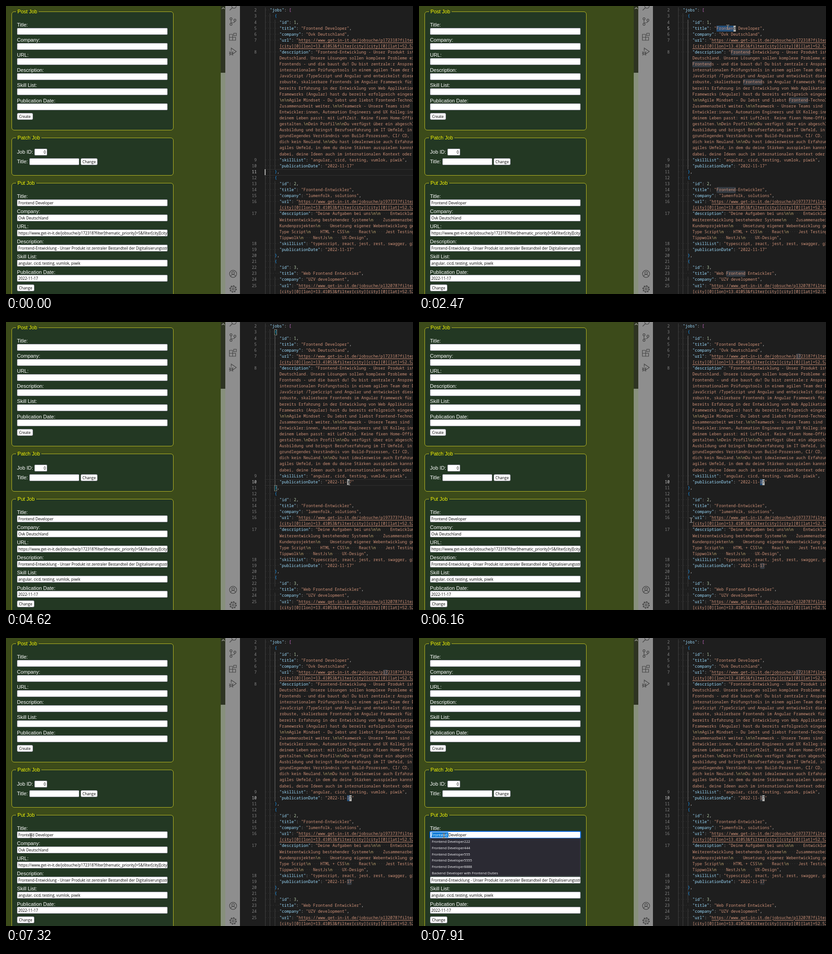
Animation of 889x630 px, one loop 8000 ms. Source, as an HTML page:

```html
<!DOCTYPE html>
<html lang="de">
<head>
<meta charset="utf-8">
<title>Job forms and JSON</title>
<style>
html, body { margin: 0; width: 100%; height: 100%; overflow: hidden; background: #3c4b1a; }
#stage { position: relative; width: 889px; height: 630px; overflow: hidden; background: #3c4b1a; }
#stage div { position: absolute; box-sizing: border-box; white-space: pre; }
.set { left: 12px; width: 354px; background: #233823; border: 1px solid #b8b824; border-radius: 6px; }
.legend, .label { font: 11.1px/14px "Liberation Sans", Arial, sans-serif; height: 14px; color: #fff; }
#stage .legend { left: 22px; padding: 0 3px; color: #ff0; }
.legend::before { content: ""; position: absolute; z-index: -1; left: 0; right: 0; top: 6px; height: 3px; background: #233823; }
.field, .button, .menu { font: 8.25px/13px "Open Sans", "Noto Sans", sans-serif; color: #000; }
.field { height: 15px; background: #fff; border: 1px solid #8f8f9d; border-radius: 2px; padding: 0 2px; overflow: hidden; }
.button { height: 15px; background: #fff; border: 1px solid #8f8f9d; border-radius: 3px; text-align: center; }
.focus { outline: 2px solid #0a66d8; outline-offset: -1px; border-color: #0a66d8; }
.picked { background: #0078d7; color: #fff; }
.menu { left: 24px; top: 438px; width: 329px; height: 83px; background: #2b2a33; border: 1px solid #42414d; color: #fbfbfe; }
.menu div { left: 3px; font-size: 7.6px; line-height: 14px; }
.editor { left: 511px; top: 0; width: 378px; height: 630px; background: #1e1e1e; }
.row, .num, .caret { font: 8.78px/13.09px "Noto Sans Mono", "DejaVu Sans Mono", monospace; height: 13.09px; color: #d4d4d4; }
.num { left: 511px; width: 36.5px; text-align: right; color: #858585; }
.num.on { color: #d6d6d6; }
.key { color: #9cdcfe; } .str { color: #ce9178; } .esc { color: #d7ba7d; } .int { color: #b5cea8; }
.link { text-decoration: underline; text-underline-offset: 1.5px; text-decoration-thickness: 1px; }
.dot { color: #464646; }
.guide { width: 1px; background: #404040; }
.guide.on { background: #707070; }
.line { left: 565px; width: 324px; height: 14px; border: solid #303030; border-width: 1px 0; }
.mark { background: #343a41; border-radius: 2px; height: 13px; }
.sel { background: #264f78; height: 13px; }
.blur .sel { background: #3a3d41; }
.blur .mark { background: #2b2e32; }
.pair { left: 586px; width: 6px; height: 13px; border: 1px solid #888; background: #10281a; }
.caret { width: 5.3px; background: #b4b4b2; color: #1e1e1e; overflow: hidden; }
#mouse { left: 0; top: 0; width: 7px; height: 11px; mix-blend-mode: difference; }
#stage svg { position: absolute; left: 0; top: 0; overflow: visible; }
</style>
</head>
<body>
<div id="stage"></div>
<script>
const stage = document.getElementById('stage');
const LOOP = 8000, CHAR = 5.268, PITCH = 13.09, COL0 = 565.6, TOP0 = 3.4;

function add(cls, box = {}, html = '', parent = stage) {
  const el = document.createElement('div');
  el.className = cls;
  for (const k in box) el.style[k] = box[k] + 'px';
  el.innerHTML = html;
  return parent.appendChild(el);
}
const rowTop = r => TOP0 + r * PITCH;
const esc = s => s.replace(/&/g, '&amp;').replace(/</g, '&lt;');

// ---- Forms ----
const labels = ['Title:', 'Company:', 'URL:', 'Description:', 'Skill List:', 'Publication Date:'];
const values = ['<span>Frontend </span>Developer', 'Ovk Deutschland',
  'https://www.get-in-it.de/jobsuche/p172318?filter[thematic_priority]=5&amp;filter[city][city]',
  'Frontend-Entwicklung - Unser Produkt ist zentraler Bestandteil der Digitalisierungsstrategie',
  'angular, cicd, testing, vumlok, piwik', '2022-11-17'];

const label = (x, y, text) => add('label', { left: x, top: y - 7 }, text);
const field = (x, y, width, text) => add('field', { left: x, top: y - 7.5, width }, text);
const button = (x, y, width, text) => add('button', { left: x, top: y - 7.5, width }, text);
function fieldset(top, height, name) {
  add('set', { top, height });
  add('legend', { top: top - 7 }, name).style.zIndex = 0;
}
function form(y, texts, action, width) {
  const fields = labels.map((name, i) => {
    label(24, y + 33.1 * i, name);
    return field(24, y + 14.3 + 33.1 * i, 329, texts[i] || '');
  });
  button(24, y + 200.3, width, action);
  return fields;
}
fieldset(12, 259.5, 'Post Job');
form(41, [], 'Create', 34.5);
fieldset(288, 82.5, 'Patch Job');
label(24, 319, 'Job ID:');
field(62, 319.5, 28, '0').style.textAlign = 'right';
label(24, 340, 'Title:');
field(51, 340, 109, '');
button(163, 340, 37, 'Change');
fieldset(387, 260, 'Put Job');
const titleField = form(416, values, 'Change', 37.5)[0];

const menu = add('menu');
['Frontend Developer222', 'Frontend Developer444', 'Frontend Developer555', 'Frontend Developer5555',
 'Frontend Developer8888', 'Backend Developer with Frontend Duties']
  .forEach((s, i) => add('', { top: -1 + 13.8 * i }, s, menu));

// ---- Scrollbar and activity bar ----
const block = (left, top, width, height, color) =>
  add('', { left, top, width, height }).style.background = color;
block(469, 0, 10, 630, '#87907c');
block(469, 0, 10, 146, '#2e3422');
block(479, 0, 32, 630, '#8e8e8e');
add('', { left: 0, top: 0 }, `<svg width="520" height="630" fill="none" stroke="#444" stroke-width="1.2">
  <path d="M471.5 6.5l3-3 3 3" stroke="#b0b0a8"/>
  <circle cx="498" cy="0" r="5"/><path d="M494.5 3.5l-6 6"/>
  <circle cx="491.5" cy="28" r="2.3"/><circle cx="491.5" cy="40" r="2.3"/><circle cx="500" cy="31" r="2.3"/>
  <path d="M491.5 30.3v7.4M500 33.3q0 3.2-4 3.2-3.500 0-4.500 1.500"/>
  <path d="M488 62h7v13h-7zM488 68.500h13.500V75H495M497.500 59.500h5.500v5.500h-5.500z"/>
  <path d="M492 98v-6l11 7.500-8.500 6"/><circle cx="492" cy="103.500" r="3"/>
  <path d="M487.500 100l2 1.500M487 104h2M488 108l1.700-1.700M496.500 100l-2 1.500M497 104h-2M496 108l-1.700-1.700M489 103.500h6"/>
  <circle cx="496" cy="586" r="7.800"/><circle cx="496" cy="584" r="2.900"/><path d="M490.500 591.500q1-4 5.500-4t5.500 4"/>
  <circle cx="496" cy="619" r="5.800"/><circle cx="496" cy="619" r="2.300"/>
  <circle cx="496" cy="619" r="7" stroke-width="2" stroke-dasharray="2.750 2.750"/></svg>`);

// ---- Code ----
add('editor');
const wrapUrl = '[city][0][lon]=13.41053&filter[city][city][0][lat]=52.5200';
const url = id => `"url": "https://www.get-in-it.de/jobsuche/${id}?filter[`;
// [line number (0 = wrapped), indent, text]
const code = [
  [2, 2, '"jobs": ['],
  [3, 4, '{'],
  [4, 6, '"id": 1,'],
  [5, 6, '"title": "Frontend Developer",'],
  [6, 6, '"company": "Ovk Deutschland",'],
  [7, 6, url('p172318')],
  [0, 6, wrapUrl],
  [8, 6, '"description": "Frontend-Entwicklung - Unser Produkt ist'],
  ...['Deutschland. Unsere Lösungen sollen komplexe Probleme ein',
    'Frontends - und die baust du! Du bist zentrale:r Ansprech',
    'internationalen Prüfungstools in einem agilen Team der D',
    'JavaScript /TypeScript und Angular und entwickelst diese',
    'robuste, skalierbare Frontends im Angular Framework für ',
    'bereits Erfahrung in der Entwicklung von Web Applikation',
    'Frameworks (Angular) hast du bereits erfolgreich eingese',
    '\\n\\nAgile Mindset - Du lebst und liebst Frontend-Technol',
    'Zusammenarbeit weiter.\\n\\nTeamwork - Unsere Teams sind ',
    'Entwickler:innen, Automation Engineers und UX Kolleg:inn',
    'deinem Leben passt: mit LuftZeit. Keine fixen Home-Offic',
    'gestalten.\\nDein Profil\\n\\nDu verfügst über ein abgeschl',
    'Ausbildung und bringst Berufserfahrung im IT Umfeld, in ',
    'grundlegendes Verständnis von Build-Prozessen, CI/ CD, ',
    'dich kein Neuland.\\n\\nDu hast idealerweise auch Erfahrun',
    'agiles Umfeld, in dem du deine Stärken ausspielen kannst',
    'dabei, deine Ideen auch im internationalen Kontext oder '].map(s => [0, 6, s]),
  [9, 6, '"skillList": "angular, cicd, testing, vumlok, piwik",'],
  [10, 6, '"publicationDate": "2022-11-17"'],
  [11, 4, '},'],
  [12, 4, '{'],
  [13, 6, '"id": 2,'],
  [14, 6, '"title": "Frontend-Entwickler",'],
  [15, 6, '"company": "lumenfolk, solutions",'],
  [16, 6, url('p197373')],
  [0, 6, wrapUrl],
  [17, 6, '"description": "Deine Aufgaben bei uns\\n\\n    Entwicklung'],
  ...['Weiterentwicklung bestehender Systeme\\n    Zusammenarbeit',
    'Kundenprojekten\\n    Umsetzung eigener Webentwicklung ge',
    'Type Script\\n    HTML + CSS\\n    React\\n    Jest Testing',
    'Tippwolk\\n    NestJs\\n    UX-Design",'].map(s => [0, 6, s]),
  [18, 6, '"skillList": "typescript, react, jest, rest, swagger, git'],
  [19, 6, '"publicationDate": "2022-11-17"'],
  [20, 4, '},'],
  [21, 4, '{'],
  [22, 6, '"id": 3,'],
  [23, 6, '"title": "Web Frontend Entwickler",'],
  [24, 6, '"company": "UZV development",'],
  [25, 6, url('p132078')],
  [0, 6, wrapUrl]
];

const span = (cls, s) => `<span class="${cls}">${s}</span>`;
const dots = s => s.replace(/ +/g, m => span('dot', '·'.repeat(m.length)));
// Spaces are replaced before tags are added, so attributes stay intact.
function paintString(s) {
  const comma = s.endsWith('",') ? ',' : '';
  const body = comma ? s.slice(0, -1) : s;
  const html = body.split(/(\\n|https:.*|^\[city\].*)/).map(p =>
    p === '\\n' ? span('esc', p) : /^(https:|\[city)/.test(p) ? span('link', esc(p)) : dots(esc(p))).join('');
  return span('str', html) + comma;
}
function paintValue(s) {
  if (s[0] === '"') return paintString(s);
  if (s === '[') return '<span style="color:#da70d6">[</span>';
  return s.replace(/\d+/, m => span('int', m));
}
function paint(num, s) {
  if (!num) return paintString(s);
  const m = s.match(/^("\w+"): (.*)$/);
  if (m) return span('key', m[1]) + ':' + dots(' ') + paintValue(m[2]);
  return s.replace(/[{}]/, b => `<span style="color:#179fff">${b}</span>`);
}

const guide = (col, from, to) =>
  add('guide', { left: Math.round(COL0 + col * CHAR), top: rowTop(from), height: (to - from) * PITCH });
guide(0, 0, 48);
guide(2, 1, 48);
const objectGuide = guide(4, 2, 27);
guide(4, 29, 44);
guide(4, 46 - 1, 48);

const under = add('');
add('row', { left: COL0, top: rowTop(-1) }, '<span style="color:#ffd700">{</span>');
const nums = code.map(([num, indent, text], r) => {
  const lead = num ? dots(' '.repeat(indent)) : ' '.repeat(indent);
  add('row', { left: COL0, top: rowTop(r) }, lead + paint(num, text));
  return add('num', { top: rowTop(r) }, num || '');
});
const over = add('');

const mouse = add('');
mouse.id = 'mouse';
mouse.innerHTML = '<svg width="7" height="11" fill="none" stroke="#eee"><path d="M.5 .5h2l1 1 1-1h2M3.500 1v9M.5 10.500h2l1-1 1 1h2"/></svg>';

// ---- Timeline ----
const path = [[0, -50, 0], [590, 776, 351], [710, 738, 200], [830, 697, 75], [980, 689, 66],
  [1130, 682, 57], [1280, 679, 52], [1400, 674, 46], [3030, 687, 140], [3150, 674, 244],
  [4340, 748, 351], [4870, -50, 0], [5890, 762, 422], [6040, 680, 430], [6160, 594, 433],
  [6300, 430, 434], [6420, 268, 434], [6570, 150, 434], [6690, 80, 433], [6810, 40, 432],
  [6930, 28, 432], [7050, 54, 432]];
const picked = { row: 26, num: 26, col: 29, sel: 28, word: '17' };
const edits = [
  [0, { row: 27, num: 27, bar: true }],
  [1800, { row: 3, num: 3, col: 14, pair: true }],
  [1950, { row: 3, num: 3, col: 17, sel: 10, word: 'Frontend', pair: true }],
  [2100, { row: 3, num: 3, col: 17, sel: 10, word: 'Frontend' }],
  [3430, { row: 18, num: 7, col: 14 }],
  [3550, { row: 18, num: 7, col: 14, pair: true }],
  [4620, { row: 26, num: 26, col: 28, pair: true }],
  [4870, { ...picked, pair: true }],
  [4990, picked]
];
const at = (table, t) => table.filter(step => step[0] <= t).pop();
const textX = col => COL0 + (6 + col) * CHAR;

function showEdit(s) {
  under.innerHTML = over.innerHTML = '';
  nums.forEach((n, r) => n.classList.toggle('on', r === s.num));
  objectGuide.classList.toggle('on', !s.bar);
  const top = rowTop(s.row);
  if (s.sel === undefined) add('line', { top }, '', under);
  else add('sel', { left: textX(s.sel), top, width: (s.col - s.sel + 1) * CHAR }, '', under);
  if (s.word) code.forEach(([, , text], r) => {
    const i = text.indexOf(s.word);
    if (i >= 0 && r !== s.row) add('mark', { left: textX(i), top: rowTop(r), width: s.word.length * CHAR }, '', under);
  });
  if (s.pair) [1, 27].forEach(r => add('pair', { top: rowTop(r) }, '', under));
  if (s.bar) add('caret', { left: 565, top, width: 1.5 }, '', over);
  else add('caret', { left: textX(s.col), top }, esc(code[s.row][2][s.col]), over);
}

let shown;
function draw() {
  const t = performance.now() % LOOP;
  const edit = at(edits, t)[1];
  if (edit !== shown) showEdit(shown = edit);
  const [, x, y] = at(path, t);
  mouse.style.transform = `translate(${x - 3}px, ${y - 5}px)`;
  under.classList.toggle('blur', t >= 7470);
  titleField.classList.toggle('focus', t >= 7470);
  titleField.firstChild.className = t >= 7630 ? 'picked' : '';
  menu.style.display = t >= 7770 ? 'block' : 'none';
  requestAnimationFrame(draw);
}
draw();
</script>
</body>
</html>
```
